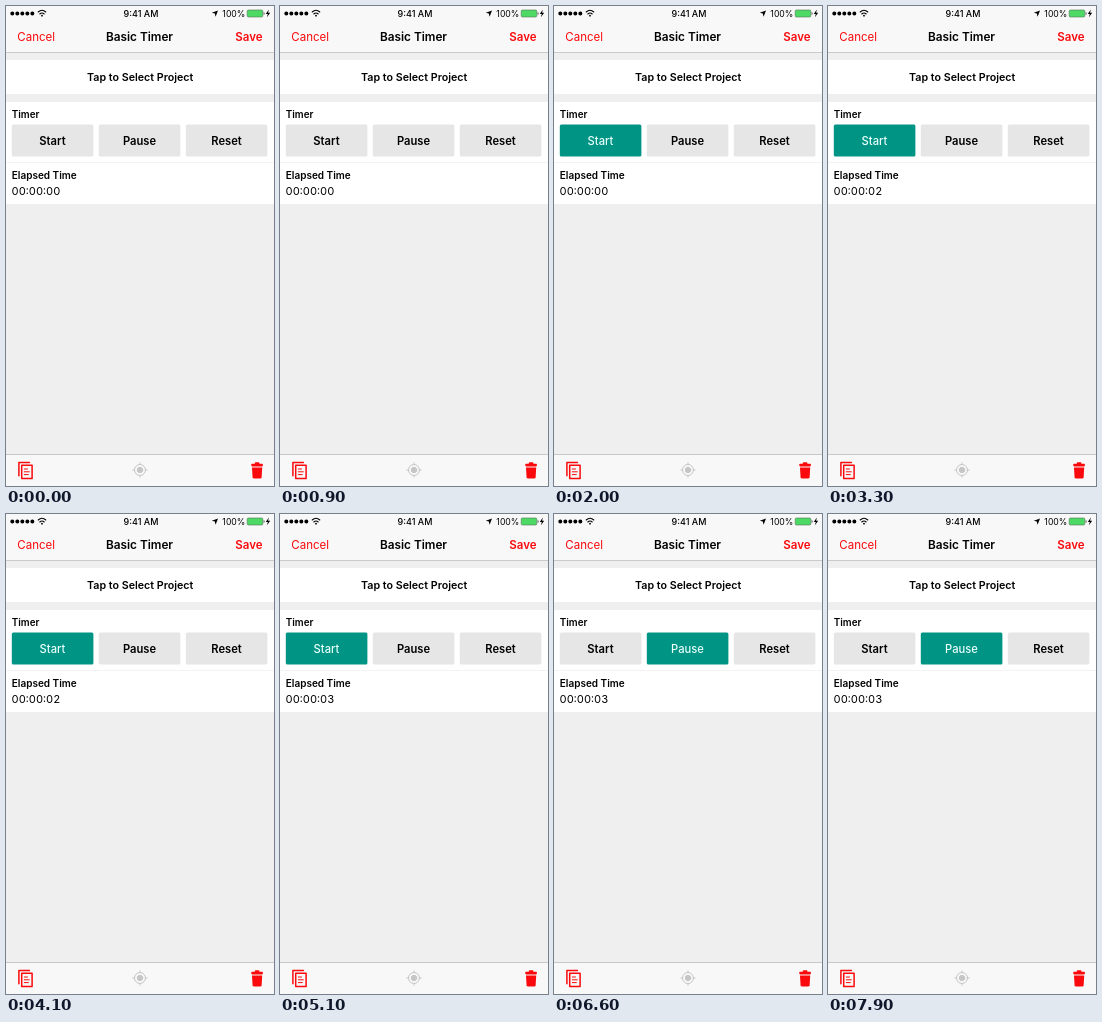
An HTML page that plays this animation: 268x480 px, repeating every 8000 ms.

```html
<!DOCTYPE html>
<html lang="en">
<head>
<meta charset="utf-8">
<title>Basic Timer</title>
<style>
  html, body { margin: 0; width: 100%; height: 100%; overflow: hidden; background: #efefef; }
  svg { display: block; width: 268px; height: 480px; }
  text { font: 600 10px Inter, "Liberation Sans", sans-serif; }
  .mid { text-anchor: middle; }
  .end { text-anchor: end; }
  .red { fill: #fa0a0c; }
  .line { fill: none; stroke-linecap: round; stroke-linejoin: round; }
  .button rect { fill: #e6e6e6; }
  .button text { font-size: 11.2px; }
  .button.on rect { fill: #009485; }
  .button.on text { fill: #e9fffb; font-weight: 500; }
</style>
</head>
<body>
<svg viewBox="0 0 268 480">
  <rect width="268" height="480" fill="#efefef"/>
  <rect width="268" height="46" fill="#f8f8f8"/>
  <rect y="46" width="268" height="1" fill="#cacaca"/>
  <rect y="54" width="268" height="34" fill="#fff"/>
  <rect y="96" width="268" height="102" fill="#fff"/>
  <rect y="156" width="268" height="1" fill="#f3f3f3"/>
  <rect y="448" width="268" height="32" fill="#f8f8f8"/>
  <rect y="448" width="268" height="1" fill="#c8c8c8"/>

  <!-- status bar -->
  <path class="line" d="M6.3 7.4h.01m5 0h.01m5 0h.01m5 0h.01m5 0h.01" stroke="#000" stroke-width="4"/>
  <g class="line" stroke="#000" stroke-width="1.1">
    <path d="M32.2 6q3.8-3.4 7.6 0M33.8 8q2.2-1.9 4.4 0"/>
    <path d="M36 9.7h.01" stroke-width="1.8"/>
  </g>
  <text class="mid" x="135" y="10.7" style="font-size:9px;font-weight:500">9:41 AM</text>
  <path d="M212 4.4l-2.4 6.4-.8-3.3-3-.7z"/>
  <text class="end" x="239.4" y="10.7" style="font-size:8.7px;font-weight:400">100%</text>
  <rect x="241.2" y="4" width="15.6" height="7" rx="1.2" fill="#4cd964" stroke="#55725a" stroke-width=".6"/>
  <path d="M257.6 6v3q1-.3 1-1.5t-1-1.5z" fill="#555"/>
  <path d="M262.8 3.6l-3 4.4h2l-.9 3.3 3.3-4.5h-2.1z"/>

  <!-- navigation bar -->
  <text class="red" x="11.3" y="34.5" style="font-size:11.5px;font-weight:400">Cancel</text>
  <text class="mid" x="133.5" y="34.5" style="font-size:11.8px">Basic Timer</text>
  <text class="red end" x="256.5" y="34.5" style="font-size:11.5px">Save</text>

  <!-- form -->
  <text class="mid" x="134.2" y="75.3" style="font-size:10.7px">Tap to Select Project</text>
  <text x="5.8" y="111.9" style="font-size:9.8px">Timer</text>
  <g id="buttons"></g>
  <text x="5.8" y="173.4" style="font-size:10px">Elapsed Time</text>
  <text id="clock" x="5.6" y="189.2" style="font-size:11px;font-weight:400;font-variant-numeric:tabular-nums">00:00:00</text>

  <!-- toolbar -->
  <g class="line" stroke="#fa0a0c" stroke-width="1.5">
    <path d="M15.7 459.2v13.2h10.4v-13.2zM23.4 456.4h-10.5v13.4"/>
    <path d="M18.3 463h3.2m-3.2 2.8h5m-5 2.8h4" stroke-width="1"/>
  </g>
  <g class="line" stroke="#c6c6c6">
    <circle cx="134" cy="464" r="5.5"/>
    <path d="M134 456.8v1.7m0 11v1.7M126.8 464h1.7m11 0h1.7"/>
    <circle cx="134" cy="464" r="2.7" fill="#c6c6c6"/>
  </g>
  <g class="red">
    <path d="M246 461.6h10.2l-.6 9.6q-.2 1.4-1.6 1.4h-5.8q-1.4 0-1.6-1.4z"/>
    <rect x="245.3" y="457.8" width="11.6" height="2.6" rx=".8"/>
    <rect x="248.8" y="456.2" width="4.6" height="2.4" rx=".8"/>
  </g>
</svg>
<script>
  const LOOP = 8000, START = 1700, PAUSE = 5400;
  const TICKS = [2200, 3200, 4300];
  const clock = document.getElementById('clock');
  const group = document.getElementById('buttons');

  group.innerHTML = ['Start', 'Pause', 'Reset'].map((label, i) => {
    const x = 5.8 + i * 87;
    return `<g class="button"><rect x="${x}" y="118.6" width="81.6" height="32" rx="1.5"/>
      <text class="mid" x="${x + 40.7}" y="138.6">${label}</text></g>`;
  }).join('');
  const buttons = [...group.children];

  function draw(now) {
    const t = now % LOOP;
    const active = t < START ? -1 : t < PAUSE ? 0 : 1;
    buttons.forEach((b, i) => b.classList.toggle('on', i === active));
    clock.textContent = '00:00:0' + TICKS.filter(tick => t >= tick).length;
  }

  const origin = performance.now();
  function frame() {
    draw(performance.now() - origin);
    requestAnimationFrame(frame);
  }
  frame();
</script>
</body>
</html>
```
